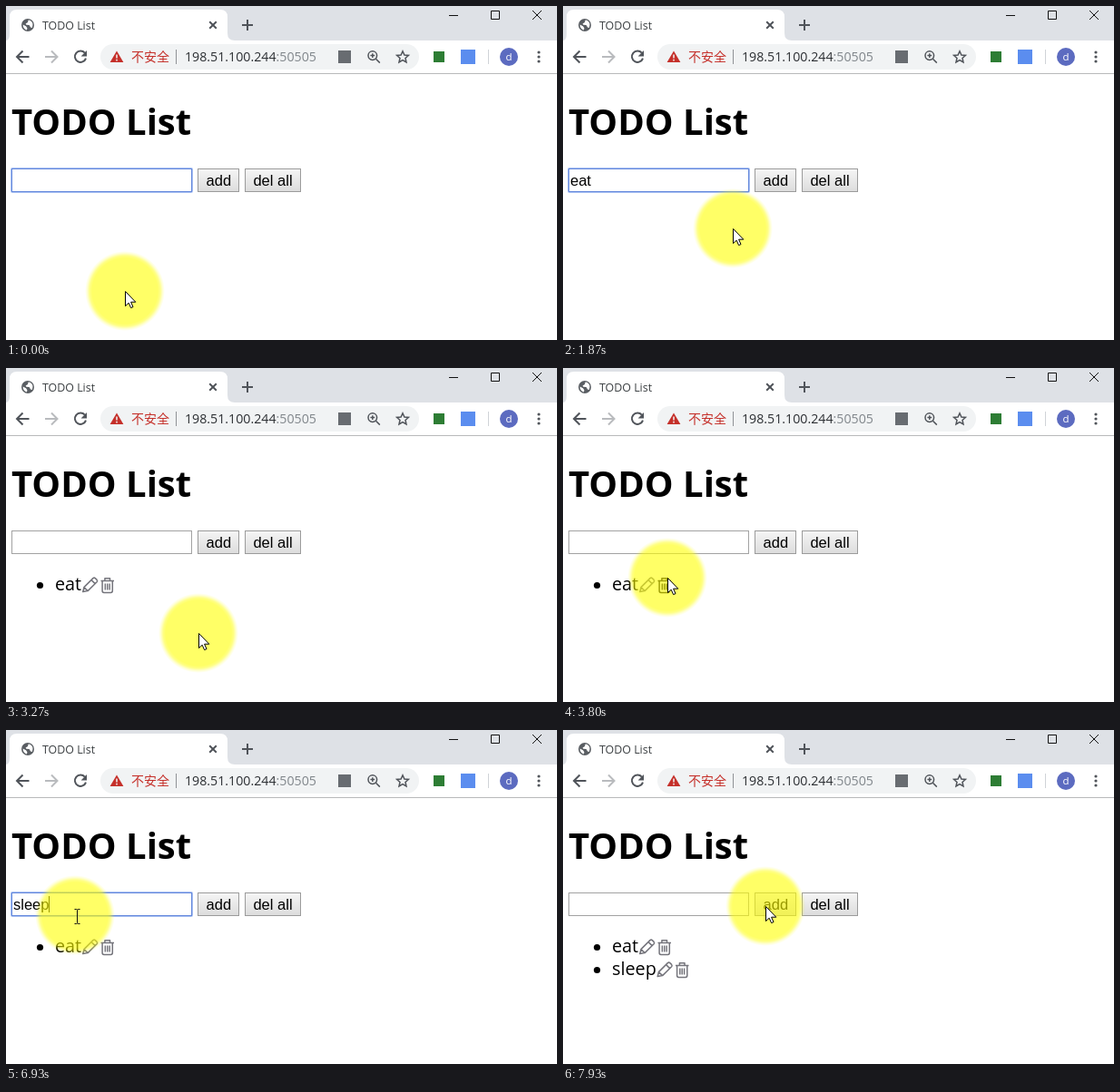
An HTML page for the animation above (8000 ms loop, 607 by 368 pixels).

```html
<!DOCTYPE html>
<html lang="en">
<head>
<meta charset="utf-8">
<title>TODO List</title>
<style>
  html, body { margin: 0; width: 100%; height: 100%; overflow: hidden; background: #fff; }
  svg { display: block; width: 607px; height: 368px; }
  text { white-space: pre; }
  .ui { font-family: "Open Sans", "Noto Sans", sans-serif; }
  .form { font-family: "Liberation Sans", Arial, sans-serif; font-size: 16.5px; }
  .line { fill: none; stroke: #50545a; stroke-width: 2; }
  .thin { fill: none; stroke: #111; stroke-width: 1; }
  .btn { fill: url(#face); stroke: #9b9b9b; }
  .icon { fill: none; stroke: #75757c; stroke-width: 1.5; stroke-linejoin: round; }
  .icon.hover { stroke: #111; }
</style>
</head>
<body>
<svg viewBox="0 0 607 368" xmlns="http://www.w3.org/2000/svg">
  <defs>
    <linearGradient id="face" x2="0" y2="1">
      <stop offset="0" stop-color="#f5f5f5"/><stop offset="1" stop-color="#dcdcdc"/>
    </linearGradient>
    <radialGradient id="glow">
      <stop offset=".82" stop-color="#ff0" stop-opacity=".6"/>
      <stop offset=".88" stop-color="#ff0" stop-opacity=".48"/>
      <stop offset=".95" stop-color="#ff0" stop-opacity=".15"/>
      <stop offset="1" stop-color="#ff0" stop-opacity="0"/>
    </radialGradient>
    <path id="pen" d="M1.2 16.6 2.4 11.6 12.4 1.6Q13.6.6 14.8 1.6L16.6 3.4Q17.6 4.6 16.6 5.8L6.6 15.6ZM10.6 3.6 14.6 7.6M2.4 11.6 6.6 15.6"/>
    <path id="bin" d="M0 4.5H14.5M4.4 4.4V1.8H10V4.4M1.6 4.8V15.6Q1.6 17.5 3.4 17.5H11Q12.8 17.5 12.8 15.6V4.8M4.8 7.4V14.6M7.2 7.4V14.6M9.6 7.4V14.6"/>
  </defs>

  <!-- Tab strip -->
  <rect width="607" height="38" fill="#dee1e6"/>
  <path d="M0 38Q4 38 4 30V12Q4 4 12 4H236Q244 4 244 12V30Q244 38 252 38Z" fill="#fff"/>
  <circle cx="24" cy="21" r="7" fill="#5a5e63"/>
  <path d="M18.6 20.6 22 22.2 23.4 24.2 23 26.4Q18.8 25.6 18.6 20.6ZM24.6 15.6 24 18 21.6 19.4 22.4 20.8 25.6 21 27 23.6 28.8 24Q31 18.2 26.4 15.8Z" fill="#fff"/>
  <text class="ui" x="40" y="25.5" font-size="12.4" fill="#3c4043">TODO List</text>
  <path class="line" d="M224.2 17.2 231.8 24.8M231.8 17.2 224.2 24.8"/>
  <path class="line" d="M260 21H272M266 15V27"/>
  <path class="thin" d="M488 10.5H498M534.5 5.5H543.5V14.5H534.5ZM580 5 590 15M590 5 580 15"/>

  <!-- Toolbar -->
  <path d="M0 74.5H607" stroke="#b8b9bb"/>
  <path class="line" d="M25.5 56H12.5M18.5 49.5 12 56 18.5 62.5"/>
  <path class="line" style="stroke:#b9bbbe" d="M43 56H56M50 49.5 56.5 56 50 62.5"/>
  <path class="line" d="M86.8 51.6A6.2 6.2 0 1 0 88 57.6"/>
  <path d="M89 49V55.4H82.6Z" fill="#50545a"/>
  <rect x="104" y="42" width="351" height="28" rx="14" fill="#f1f3f4"/>
  <path d="M122 49.5 129.4 62H114.6Z" fill="#c5302a"/>
  <path d="M122 53.6V57.6M122 58.8V60.4" stroke="#f1f3f4" stroke-width="1.5"/>
  <text x="138" y="61" font-size="14" fill="#c5302a" font-family="'Noto Sans CJK SC','Noto Sans CJK',sans-serif">不安全</text>
  <path d="M187.5 48V64" stroke="#8f9296"/>
  <text class="ui" x="197" y="61" font-size="14.2" fill="#2b2e32">198.51.100.244<tspan fill="#80868b">:50505</tspan></text>
  <rect x="366" y="49" width="14" height="14" fill="#686c71"/>
  <g class="line" style="stroke-width:1.5">
    <circle cx="403.8" cy="54.6" r="4.8"/>
    <path d="M407.4 58.2 411.8 62.6M401.4 54.6H406.2M403.8 52.2V57"/>
    <path d="M437 49.8 438.9 54 443.4 54.4 440 57.4 441 62 437 59.6 433 62 434 57.4 430.6 54.4 435.1 54Z"/>
  </g>
  <rect x="471" y="50" width="12" height="12" fill="#2d7d34"/>
  <rect x="501" y="48" width="16" height="16" fill="#5b8def"/>
  <path d="M531.5 48V64" stroke="#d0d3d7"/>
  <circle cx="554" cy="56" r="10" fill="#5c6bc0"/>
  <text class="ui" x="554" y="60" font-size="11.5" fill="#fff" text-anchor="middle">d</text>
  <g fill="#50545a"><circle cx="587" cy="51" r="1.6"/><circle cx="587" cy="56" r="1.6"/><circle cx="587" cy="61" r="1.6"/></g>

  <!-- Page -->
  <text class="ui" x="6" y="141.5" font-size="40" font-weight="700">TODO List</text>
  <rect id="ring" x="5.5" y="178.5" width="200" height="27" rx="1" fill="none" stroke="#a9c0f2"/>
  <rect id="box" x="6.5" y="179.5" width="198" height="25" fill="#fff"/>
  <text id="entry" class="form" x="8" y="198"></text>
  <rect id="caret" y="183" width="1" height="18"/>
  <rect class="btn" x="211.5" y="179.5" width="45" height="25"/>
  <rect class="btn" x="263.5" y="179.5" width="61" height="25"/>
  <text class="form" x="234.3" y="198" text-anchor="middle">add</text>
  <text class="form" x="294" y="198" text-anchor="middle">del all</text>
  <g id="first">
    <circle cx="37.5" cy="239.5" r="3.6"/>
    <text class="ui" x="54" y="245" font-size="19.8">eat</text>
    <use id="edit" class="icon" href="#pen" x="83.5" y="230"/>
    <use id="remove" class="icon" href="#bin" x="104.5" y="230"/>
  </g>
  <g id="second">
    <circle cx="37.5" cy="264.5" r="3.6"/>
    <text class="ui" x="54" y="270" font-size="19.8">sleep</text>
    <use class="icon" href="#pen" x="103" y="255"/>
    <use class="icon" href="#bin" x="124" y="255"/>
  </g>

  <!-- Pointer -->
  <g id="pointer">
    <circle r="44" fill="url(#glow)"/>
    <path id="arrow" d="M.5.5V16.6L4.2 13.2 6.6 18.6 9 17.6 6.6 12.2H11.8Z" fill="#fff" stroke="#000"/>
    <path id="beam" class="thin" d="M-.5-6.5H1.5Q2.5-6.5 2.5-5.5Q2.5-6.5 3.5-6.5H5.5M2.5-5.5V8.5M-.5 9.5H1.5Q2.5 9.5 2.5 8.5Q2.5 9.5 3.5 9.5H5.5"/>
  </g>
</svg>
<script>
const LOOP = 8000, TICK = 200 / 3, BLINK = 530;
const FIRST_ADD = 2470, SECOND_ADD = 7670;
const $ = id => document.getElementById(id);
const show = (id, on) => $(id).setAttribute('visibility', on ? 'visible' : 'hidden');

// time, field text, focused; each entry restarts the caret blink
const edits = [
  [-940, '', true], [470, 'e', true], [600, 'ea', true], [1070, 'eat', true],
  [FIRST_ADD, '', false], [4000, '', true], [4800, 's', true], [4930, 'sl', true],
  [5200, 'sle', true], [5330, 'slee', true], [5530, 'sleep', true], [SECOND_ADD, '', false]
];

// time, x, y
const path = [
  [0, 131, 314], [1600, 131, 314], [1870, 187, 245], [2130, 254, 182], [2270, 254, 182],
  [2400, 238, 193], [2470, 238, 193], [2730, 213, 293], [3200, 213, 293], [3270, 212, 292],
  [3800, 115, 231], [4000, 69, 196], [6870, 69, 196], [7130, 140, 254], [7400, 223, 207],
  [7600, 233, 187], [7800, 233, 187], [7930, 223, 194], [8000, 223, 194]
];

function slope(i, axis) {
  const a = path[i - 1], b = path[i], c = path[i + 1];
  if (!a || !c || a[axis] === b[axis] || b[axis] === c[axis]) return 0;
  return (c[axis] - a[axis]) / (c[0] - a[0]);
}

function position(t, axis) {
  let i = 0;
  while (i < path.length - 2 && path[i + 1][0] <= t) i++;
  const a = path[i], b = path[i + 1], span = b[0] - a[0];
  const u = Math.min(1, (t - a[0]) / span), v = 1 - u;
  return a[axis] * v * v * (1 + 2 * u) + b[axis] * u * u * (3 - 2 * u)
    + span * u * v * (slope(i, axis) * v - slope(i + 1, axis) * u);
}

const advance = c => ({ s: 8, l: 4, t: 4 })[c] || 9;

function render(now) {
  const k = Math.floor((now % LOOP + 3.4) / TICK);
  const t = Math.round(k * TICK / 10) * 10 % LOOP;

  const [since, text, focus] = edits.filter(e => e[0] <= t).pop();
  $('entry').textContent = text;
  $('caret').setAttribute('x', [...text].reduce((x, c) => x + advance(c), 8));
  show('caret', focus && Math.floor((t - since) / BLINK) % 2 === 0);
  show('ring', focus);
  $('box').setAttribute('stroke', focus ? '#6488dc' : '#a2a2a2');
  show('first', t >= FIRST_ADD);
  show('second', t >= SECOND_ADD);

  const x = Math.round(position(t, 1)), y = Math.round(position(t, 2));
  const over = (left, top, right, bottom) => x > left && x < right && y > top && y < bottom;
  const inField = over(5, 179, 205, 206);
  $('pointer').setAttribute('transform', `translate(${x} ${y})`);
  show('arrow', !inField);
  show('beam', inField);
  $('edit').classList.toggle('hover', over(83, 229, 102, 249));
  $('remove').classList.toggle('hover', over(103, 229, 120, 249));
}

function loop() {
  render(performance.now());
  requestAnimationFrame(loop);
}
loop();
</script>
</body>
</html>
```
